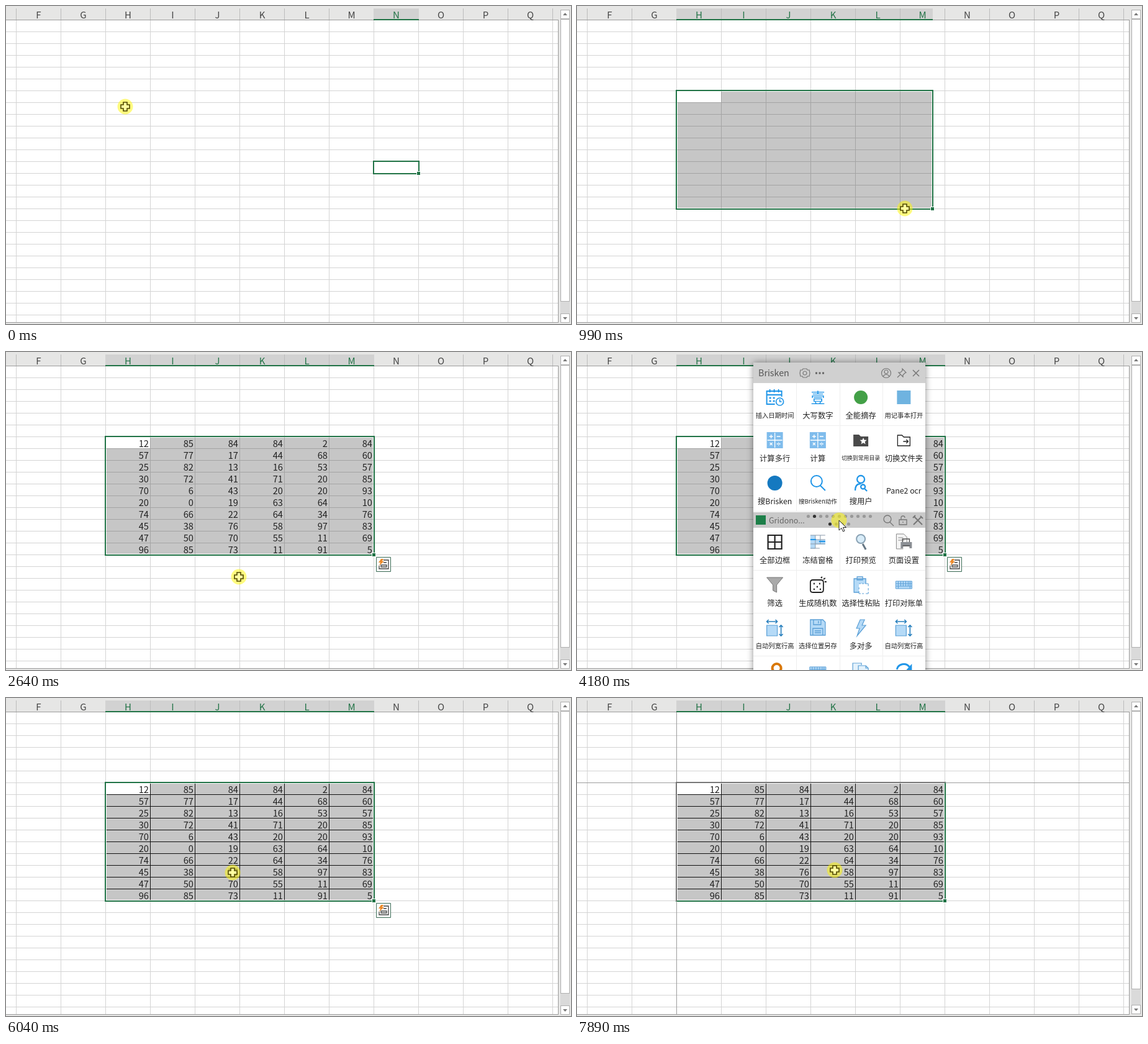
An HTML page with a canvas that plays this animation: 910x512 px, repeating every 8000 ms.

```html
<!DOCTYPE html>
<html lang="zh">
<head>
<meta charset="utf-8">
<style>
html, body { margin: 0; width: 100%; height: 100%; overflow: hidden; }
canvas { display: block; }
</style>
</head>
<body>
<canvas id="stage" width="910" height="512"></canvas>
<script>
const ctx = document.getElementById('stage').getContext('2d');
const LOOP = 8000, COL = 72, ROW = 19, GREEN = '#217346', BLUE = '#2196e8', PALE = '#b5daf7', EDGE = '#5a9fd6', GREY = '#7a7a7a';
const FONT = '"Noto Sans CJK SC", "Noto Sans CJK", "Noto Sans", sans-serif';

// The screen refreshes in bursts: [first, last, steps]
const bursts = [[0, 0, 1], [100, 890, 8], [990, 1420, 5], [1770, 2540, 8], [2640, 3420, 8], [4180, 4180, 1], [4710, 5040, 4],
  [5390, 5510, 2], [5920, 6360, 5], [6590, 6590, 1], [7030, 7240, 3], [7460, 7570, 2], [7770, 7890, 2]];
// [time, x, y]
const cursorKeys = [[0, 192, 162], [100, 187, 158], [213, 168, 148], [326, 165, 146], [990, 528, 326], [1097, 514, 331],
  [1420, 416, 252], [1770, 416, 252], [2210, 375, 362], [2640, 375, 362], [3420, 422, 271], [4600, 422, 271],
  [5040, 335, 319], [5810, 335, 319], [6030, 365, 281], [6360, 445, 244], [6920, 445, 244], [7240, 388, 314],
  [7660, 388, 314], [7890, 415, 277]];
// [time, left, top, right, bottom]
const selectionKeys = [[0, 592, 250, 664, 269], [213, 592, 250, 664, 269], [326, 160, 136, 232, 155],
  [890, 160, 136, 520, 326], [990, 160, 136, 572, 326], [1097, 160, 136, 592, 326]];
// [open, close, x, y]
const panels = [[1770, 2540, 277, -2], [4180, 5390, 284, 17], [6590, 7460, 306, -10]];
const values = ['12 85 84 84 2 84', '57 77 17 44 68 60', '25 82 13 16 53 57', '30 72 41 71 20 85', '70 6 43 20 20 93',
  '20 0 19 63 64 10', '74 66 22 64 34 76', '45 38 76 58 97 83', '47 50 70 55 11 69', '96 85 73 11 91 5'].map(r => r.split(' '));

// Icon layers: [colour, line width (0 fills), path around 0,0]
const icons = {
  calendar: [[BLUE, 2, 'M0 11H-13V-10H11V-1M-13-4H11M-8-13v5M-1-13v5M6-13v5'],
    [BLUE, 2.5, 'M-9 1h3M-3 1h3M-9 6h3M-3 6h3'], [BLUE, 1.7, 'M14 7a6 6 0 1 1-12 0a6 6 0 1 1 12 0M8 3v4h3']],
  greenDisc: [['#43a047', 0, 'M11 0a11 11 0 1 1-22 0a11 11 0 1 1 22 0']],
  blueDisc: [['#1579c0', 0, 'M12 0a12 12 0 1 1-24 0a12 12 0 1 1 24 0']],
  blueSquare: [['#6fb3e0', 0, 'M-11-11h22v22h-22z']],
  calc: [['#7fbcec', 0, 'M-13-13h26v26h-26z'], ['#fff', 1.3, 'M-9-6h6M-6-9v6M3-6h6M-8 4l4 4M-4 4l-4 4M3 6h6M6 3v1M6 8v1M0-12v24M-12 0h24']],
  starFolder: [['#4a4a4a', 0, 'M-12-9h9l3 3h12v16h-24z'], ['#fff', 0, 'M4-4l1.5 3.5 4 .3-3 2.6 1 3.9L4 4.2.5 6.3l1-3.9-3-2.6 4-.3z']],
  moveFolder: [['#222', 1.3, 'M-10-8h7l3 3h10v14h-20zM-1 2h8M4-1l3 3-3 3']],
  search: [[BLUE, 2, 'M7-3a9 9 0 1 1-18 0a9 9 0 1 1 18 0M4 4l8 8']],
  findUser: [[BLUE, 2.3, 'M6-6a6 6 0 1 1-12 0a6 6 0 1 1 12 0M-9 12c0-8 4-11 9-11M7 6a3.5 3.5 0 1 1-7 0a3.5 3.5 0 1 1 7 0M6 9l4 4']],
  borders: [['#222', 2.2, 'M-11-11h22v22h-22zM0-11v22M-11 0h22']],
  freeze: [['#fff', 0, 'M-12-11h24v22h-24z'], [PALE, 0, 'M-12-11h8v22h-8zM-4-4h16v8h-16z'],
    ['#8a9aaa', 1, 'M-12-11h24M-12-4h24M-12 3h24M-12 10h15M-4-11v21M4-11v14'], [BLUE, 2, 'M-12-4h9M2-1h10']],
  preview: [['#d8ecf8', 0, 'M7-5a7 7 0 1 1-14 0a7 7 0 1 1 14 0'], ['#8ba3b5', 2, 'M7-5a7 7 0 1 1-14 0a7 7 0 1 1 14 0'],
    ['#667784', 3, 'M3 3l5 9']],
  printer: [['#f5f5f5', 0, 'M-12-13H0l5 5V11H-12z'], ['#888', 1, 'M-12-13H0l5 5V11H-12zM-9-7h8M-9-3h10'],
    ['#8b8f94', 0, 'M-5 0H13v10H-5z'], ['#555', 1.5, 'M-2 0v-5H9v5M-2 6H10'], ['#fff', 0, 'M-1 7H9v5H-1z']],
  funnel: [['#aaa', 0, 'M-13-12H13L3 0V12L-3 9V0z'], ['#777', 1, 'M-13-12H13L3 0V12L-3 9V0z']],
  dice: [['#222', 1.8, 'M-8-8H5q4 0 4 4V8q0 4-4 4H-8q-4 0-4-4V-4q0-4 4-4zM5-11l2-2M9-9l3-2M11-5l3 0'],
    ['#222', 2.5, 'M-7-2h2M-2 3h2M3 7h2M2-2h2M-7 7h2']],
  paste: [[PALE, 0, 'M-11-10H8V12H-11z'], [EDGE, 1.3, 'M-11-10H8V12H-11zM-6-13H3v5H-6z'], ['#fff', 0, 'M-3-2H12V14H-3z'],
    [EDGE, 1, 'M-3-2h3M2-2h3M7-2h5v4M12 5v4M12 11v3h-4M5 14h-3M0 14h-3v-4M-3 7v-3']],
  keyboard: [[PALE, 0, 'M-13-6h26v12h-26z'], [EDGE, 1, 'M-13-6h26v12h-26zM-13-2h26M-13 2h26M-9-6v12M-5-6v8M-1-6v8M3-6v8M7-6v8M10-6v12']],
  resize: [[PALE, 0, 'M-13-4H4V13H-13z'], [EDGE, 1.2, 'M-13-4H4V13H-13z'],
    ['#277fbd', 1.6, 'M-13-10H4M-10-13l-3 3 3 3M1-13l3 3-3 3M10-4V13M7-1l3-3 3 3M7 10l3 3 3-3']],
  floppy: [[PALE, 0, 'M-12-13H8l4 4V12H-12z'], [EDGE, 1.3, 'M-12-13H8l4 4V12H-12zM-7-13v8H5v-8M1-11v4M-8 12V1H8V12M-5 5H5M-5 8H5']],
  bolt: [[PALE, 0, 'M-1-13H6L2-4H8L-6 13-2 1H-7z'], [EDGE, 1.2, 'M-1-13H6L2-4H8L-6 13-2 1H-7z']],
  orangeSearch: [['#d97706', 4, 'M10-4a7 7 0 1 1-14 0a7 7 0 1 1 14 0'], ['#d97706', 5, 'M-4 3l-7 7']],
  documents: [['#e4f2fc', 0, 'M-13-11H1V10H-13zM-4-8H8l4 4V13H-4z'], [EDGE, 1.2, 'M-4 10H-13V-12H1v3M-4-8H8l4 4V13H-4zM8-8v4h4']],
  refresh: [[BLUE, 3, 'M-11-2A11 10 0 0 1 9-6M11 2A11 10 0 0 1-9 6'], [BLUE, 0, 'M13-11V-1H4zM-13 11V1H-4z']],
  gear: [['#777', 1.2, 'M-3-7h6l1 2 3 0 1 5-1 5-3 0-1 2h-6l-1-2-3 0-1-5 1-5 3 0zM3 0a3 3 0 1 1-6 0a3 3 0 1 1 6 0']],
  more: [['#666', 3, 'M-7 0h3M-1.5 0h3M4 0h3']],
  user: [['#777', 1.2, 'M7.5 0a7.5 7.5 0 1 1-15 0a7.5 7.5 0 1 1 15 0M3-2a3 3 0 1 1-6 0a3 3 0 1 1 6 0M-5 5q5-6 10 0']],
  pin: [['#777', 1.2, 'M1-7l6 6-2 1-3 3 0 3-7-7 3 0 3-3zM-2 2l-5 5']],
  close: [['#777', 1.5, 'M-5-5L5 5M5-5L-5 5']],
  find: [['#777', 1.3, 'M4-2a6 6 0 1 1-12 0a6 6 0 1 1 12 0M2 3l6 6']],
  lock: [['#777', 1.3, 'M-6-1H6V7H-6zM-3-1V-4q0-3 3-3 3 0 3 3M0 2v2']],
  tools: [['#777', 2, 'M-7 7L6-6M-6-6L7 7M-8-4l4-4M4-7l4 4']],
  cross: [['#ffffa0', 0, 'M-3-7H3V-3H7V3H3V7H-3V3H-7V-3H-3z'], ['#4f4700', 1.6, 'M-3-7H3V-3H7V3H3V7H-3V3H-7V-3H-3z']],
  arrow: [['#fff', 0, 'M0 0V16L4 12.5 6.5 18 9 17 6.5 11.5H11.5z'], ['#222', 1, 'M0 0V16L4 12.5 6.5 18 9 17 6.5 11.5H11.5z']],
  analysis: [['#fff', 0, 'M-12-12h24v24h-24z'], ['#3a6b55', 1, 'M-11.5-11.5h23v23h-23z'],
    ['#444', 1.3, 'M0-7H8V7H-7V2M-4 4H5V1H-4zM0-3H5'], ['#ed8b2d', 0, 'M-4-9H0L-2-5H1L-7 2-5-3H-8z']],
};
const topCells = [['calendar', '插入日期时间'], ['壹', '大写数字'], ['greenDisc', '全能摘存'], ['blueSquare', '用记事本打开'],
  ['calc', '计算多行'], ['calc', '计算'], ['starFolder', '切换到常用目录'], ['moveFolder', '切换文件夹'],
  ['blueDisc', '搜Brisken'], ['search', '搜Brisken动作'], ['findUser', '搜用户'], ['', 'Pane2 ocr']];
const bottomCells = [['borders', '全部边框'], ['freeze', '冻结窗格'], ['preview', '打印预览'], ['printer', '页面设置'],
  ['funnel', '筛选'], ['dice', '生成随机数'], ['paste', '选择性粘贴'], ['keyboard', '打印对账单'],
  ['resize', '自动列宽行高'], ['floppy', '选择位置另存'], ['bolt', '多对多'], ['resize', '自动列宽行高'],
  ['orangeSearch', ''], ['keyboard', ''], ['documents', ''], ['refresh', '']];

function rect(x, y, w, h, color) {
  ctx.fillStyle = color;
  ctx.fillRect(x, y, w, h);
}
function disc(x, y, r, color) {
  ctx.fillStyle = color;
  ctx.beginPath();
  ctx.arc(x, y, r, 0, 7);
  ctx.fill();
}
function text(s, x, y, size, color, align = 'center') {
  ctx.font = `${size}px ${FONT}`;
  ctx.textAlign = align;
  ctx.fillStyle = color;
  ctx.fillText(s, x, y + size * 0.37);
}
function icon(name, x, y) {
  ctx.save();
  ctx.translate(x, y);
  for (const [color, width, d] of icons[name]) {
    ctx.fillStyle = ctx.strokeStyle = color;
    ctx.lineWidth = width;
    const path = new Path2D(d);
    width ? ctx.stroke(path) : ctx.fill(path);
  }
  ctx.restore();
}
function lastRefresh(t) {
  const [a, b, n] = bursts.findLast(burst => burst[0] <= t);
  if (t >= b) return b;
  const step = (b - a) / (n - 1);
  return a + Math.floor((t - a) / step) * step;
}
function tween(keys, t) {
  const i = keys.findLastIndex(key => key[0] <= t), a = keys[i], b = keys[i + 1] || a;
  const p = b === a ? 0 : (t - a[0]) / (b[0] - a[0]);
  return a.slice(1).map((v, j) => v + (b[j + 1] - v) * p);
}

function drawSheet(t) {
  const [l, top, r, b] = tween(selectionKeys, t).map(Math.round);
  const bordered = t >= 5500, frozen = t >= 7770;
  rect(0, 0, 910, 512, '#e6e6e5');
  rect(0, 23, 889, 486, '#fff');
  for (let y = 41; y < 509; y += ROW) rect(0, y, 889, 1, '#d4d4d4');
  for (let x = 16; x < 889; x += COL) {
    rect(x, 23, 1, 486, '#d4d4d4');
    rect(x, 4, 1, 18, '#bcbcbc');
  }
  rect(0, 22, 890, 1, '#9c9c9c');
  rect(0, 509, 890, 1, '#9c9c9c');
  rect(889, 22, 1, 488, '#9c9c9c');

  rect(l, 4, r - l + 1, 18, '#d2d2d2');
  for (let x = l + COL; x < r; x += COL) rect(x, 4, 1, 18, '#bcbcbc');
  rect(l, 21, r - l + 1, 2, GREEN);
  [...'FGHIJKLMNOPQ'].forEach((c, i) => {
    const x = 52.5 + i * COL;
    text(c, x, 14.5, 15, x > l && x < r ? GREEN : '#444');
  });

  if (r - l > COL || b - top > ROW) {
    ctx.globalCompositeOperation = 'multiply';
    rect(l + 2, top + 2, r - l - 3, b - top - 3, '#c6c6c6');
    ctx.globalCompositeOperation = 'source-over';
    rect(l + 2, top + 2, COL - 2, ROW - 2, '#fff');
  }
  if (bordered) {
    for (let x = l + COL; x < r; x += COL) rect(x, top + 2, 1, b - top - 3, '#111');
    for (let y = top + ROW; y < b; y += ROW) rect(l + 2, y, r - l - 3, 1, '#111');
  }
  if (t >= 2640) values.forEach((row, j) => row.forEach((v, i) => text(v, 230 + i * COL, 148 + j * ROW, 14.7, '#222', 'right')));

  ctx.strokeStyle = GREEN;
  ctx.lineWidth = 2;
  ctx.strokeRect(l, top, r - l + 1, b - top + 1);
  if (frozen) {
    rect(160, 23, 1, 486, '#9c9c9c');
    rect(0, 136, 889, 1, '#9c9c9c');
    rect(159, 135, 434, 2, '#777');
    rect(159, 135, 2, 192, '#777');
  }
  rect(r - 3, b - 3, 7, 7, '#fff');
  rect(r - 2, b - 2, 5, 5, GREEN);
  if (t >= 2640 && t < 7570) icon('analysis', 608, 342);
  drawScrollbar(frozen ? 468 : 475, frozen ? 494 : 495);
}

function drawScrollbar(thumbEnd, downY) {
  rect(893, 20, 15, downY - 20, '#dadada');
  ctx.lineWidth = 1;
  ctx.strokeStyle = '#b0b0b0';
  for (const [y, h] of [[6, 14], [21, thumbEnd - 21], [downY, 14]]) {
    rect(893, y, 15, h, '#fff');
    ctx.strokeRect(893.5, y + 0.5, 14, h);
  }
  ctx.fillStyle = '#777';
  ctx.fill(new Path2D(`M897 15h7l-3.5-4zM897 ${downY + 6}h7l-3.5 4z`));
}

function drawCells(cells, y0, px, py, cx, cy) {
  cells.forEach(([name, label], i) => {
    const w = 69.25, x = (i % 4) * w, y = y0 + Math.floor(i / 4) * 69, mid = x + w / 2;
    const hover = cx - px >= x && cx - px < x + w && cy - py >= y && cy - py < y + 69;
    if (hover) rect(x, y, w, 69, '#e8eef5');
    rect(x, y + 68, w, 1, '#eee');
    if (i % 4 < 3) rect(Math.round(x + w), y, 1, 69, '#eee');
    if (icons[name]) icon(name, mid, y + 23);
    else if (name) text(name, mid, y + 23, 23, BLUE);
    ctx.font = `12.3px ${FONT}`;
    const size = 12.3 * Math.min(1, 62 / ctx.measureText(label).width);
    text(label, mid, y + (name ? 52 : 35), size, '#222');
  });
}

function drawPanel(px, py, cx, cy) {
  ctx.save();
  ctx.translate(px, py);
  ctx.shadowColor = 'rgba(0,0,0,.45)';
  ctx.shadowBlur = 10;
  rect(0, 0, 277, 560, '#fff');
  ctx.shadowColor = 'transparent';
  rect(0, 0, 277, 33, '#d0d0d0');
  text('Brisken', 8, 17, 14.3, '#555', 'left');
  [['gear', 83], ['more', 107], ['user', 214], ['pin', 239], ['close', 262]].forEach(([name, x]) => icon(name, x, 17));
  drawCells(topCells, 33, px, py, cx, cy);
  rect(0, 241, 277, 25, '#c9c9c9');
  rect(4, 246, 16, 15, '#1d7f49');
  text('Gridono...', 25, 254, 12.5, '#666', 'left');
  for (let i = 0; i < 11; i++) disc(88.5 + i * 10, 247.5, 2.6, i === 1 ? '#333' : '#999');
  for (let i = 0; i < 4; i++) disc(123.5 + i * 10, 260, 2.6, i ? '#999' : '#333');
  [['find', 218], ['lock', 241], ['tools', 265]].forEach(([name, x]) => icon(name, x, 254));
  drawCells(bottomCells, 266, px, py, cx, cy);
  ctx.restore();
}

function draw(now) {
  const t = lastRefresh(now % LOOP);
  const [cx, cy] = tween(cursorKeys, t);
  const panel = panels.find(([open, close]) => t >= open && t < close);
  drawSheet(t);
  if (panel) drawPanel(panel[2], panel[3], cx, cy);
  disc(cx, cy, 12.5, 'rgba(255,248,0,.5)');
  icon(panel ? 'arrow' : 'cross', cx, cy);
}

const start = performance.now();
function tick() {
  draw(performance.now() - start);
  requestAnimationFrame(tick);
}
tick();
</script>
</body>
</html>
```
